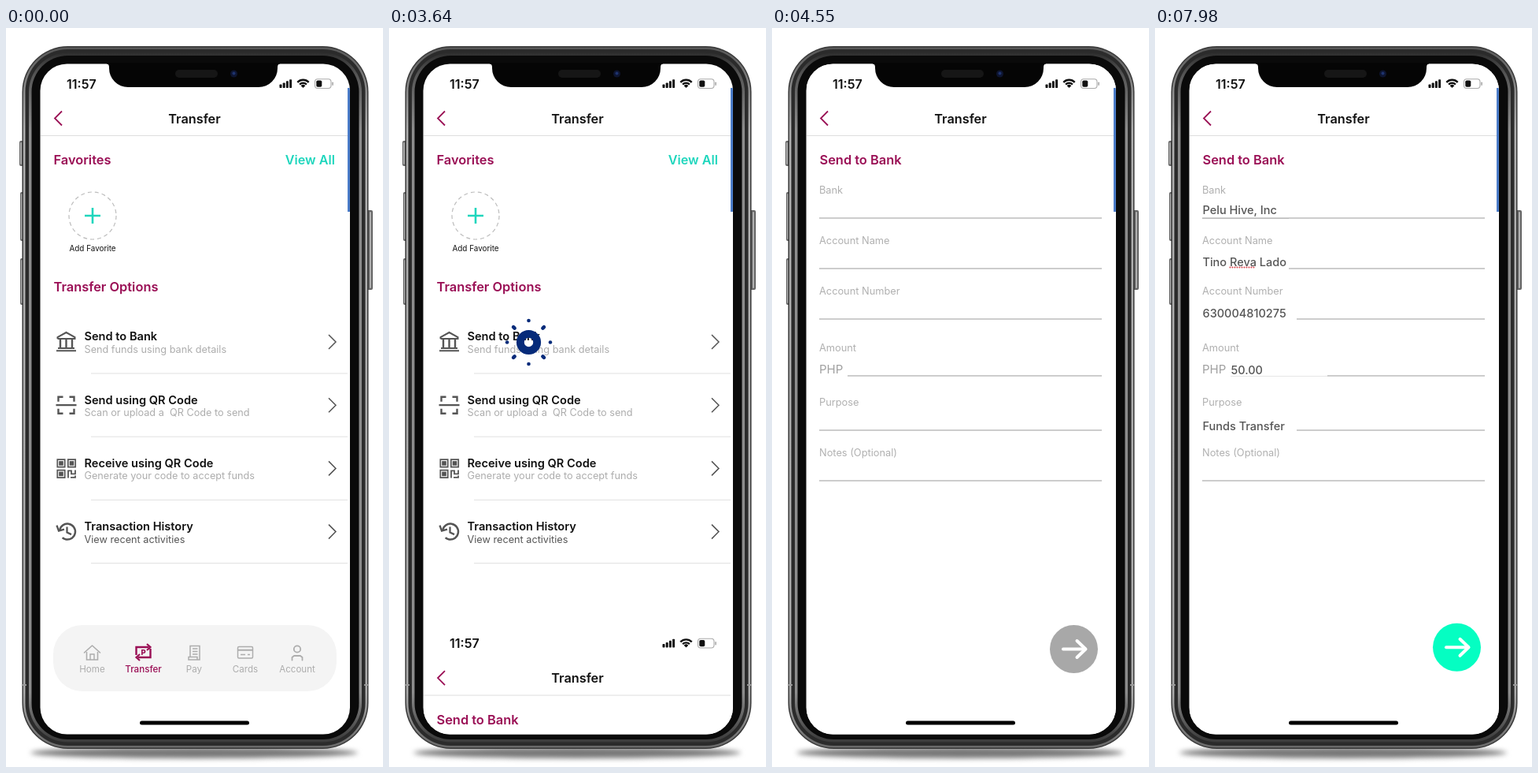
Animation, 479 px wide and 937 px high, one loop 8000 ms. Source, as an HTML page with a canvas:

```html
<!DOCTYPE html>
<html lang="en">
<head>
<meta charset="utf-8">
<title>Transfer flow</title>
<style>
html, body { margin: 0; width: 100%; height: 100%; overflow: hidden; background: #fff; }
canvas { display: block; width: 479px; height: 937px; }
</style>
</head>
<body>
<canvas id="stage"></canvas>
<script>
const W = 479, H = 937, LOOP = 8000, STEP = 70;
const canvas = document.getElementById('stage');
const ctx = canvas.getContext('2d');
const dpr = window.devicePixelRatio || 1;
canvas.width = W * dpr;
canvas.height = H * dpr;

const PLUM = '#9a0f55', TEAL = '#1fd6bd', INK = '#111', GREY = '#adadad', ICON = '#555', NAVY = '#062b7a';

const clamp = v => Math.max(0, Math.min(1, v));
const span = (t, a, b) => clamp((t - a) / (b - a));
const smooth = p => p * p * (3 - 2 * p);
const mix = (a, b, p) => a + (b - a) * p;

// ---------- drawing helpers ----------
function text(str, x, midY, size, weight, color, align = 'left') {
  ctx.font = `${weight} ${size}px Inter, Roboto, sans-serif`;
  ctx.textAlign = align;
  ctx.fillStyle = color;
  ctx.fillText(str, x, midY + size * 0.364);
}

function line(points, color, width, cap = 'butt') {
  ctx.beginPath();
  for (let i = 0; i < points.length; i += 2) ctx.lineTo(points[i], points[i + 1]);
  ctx.strokeStyle = color;
  ctx.lineWidth = width;
  ctx.lineCap = cap;
  ctx.lineJoin = cap === 'round' ? 'round' : 'miter';
  ctx.stroke();
}

function box(x, y, w, h, r, fill) {
  ctx.beginPath();
  ctx.roundRect(x, y, w, h, r);
  ctx.fillStyle = fill;
  ctx.fill();
}

function frame(x, y, w, h, r, color, width) {
  ctx.beginPath();
  ctx.roundRect(x, y, w, h, r);
  ctx.strokeStyle = color;
  ctx.lineWidth = width;
  ctx.stroke();
}

function arc(x, y, r, a, b, color, width) {
  ctx.beginPath();
  ctx.arc(x, y, r, a, b);
  ctx.strokeStyle = color;
  ctx.lineWidth = width;
  ctx.lineCap = 'butt';
  ctx.stroke();
}

function disc(x, y, r, fill) {
  ctx.beginPath();
  ctx.arc(x, y, r, 0, Math.PI * 2);
  ctx.fillStyle = fill;
  ctx.fill();
}

function group(fn) {
  ctx.save();
  fn();
  ctx.restore();
}

function vertical(...stops) {
  const g = ctx.createLinearGradient(0, 23, 0, 914);
  stops.forEach(([at, color]) => g.addColorStop(at, color));
  return g;
}

// ---------- phone ----------
function phone() {
  group(() => {
    ctx.filter = 'blur(3px)';
    ctx.beginPath();
    ctx.ellipse(239, 919, 208, 7, 0, 0, Math.PI * 2);
    ctx.fillStyle = '#777';
    ctx.fill();
  });
  [[17, 143, 32], [18, 208, 62], [18, 292, 59]].forEach(([x, y, h]) => {
    box(x, y, 6, h, 2, '#666');
    box(x + 1, y + 2, 2, h - 4, 1, '#aaa');
  });
  box(458, 231, 8, 101, 2, '#666');
  box(462, 233, 2, 97, 1, '#b0b0b0');

  const rim = vertical([0, '#555'], [0.06, '#8a8a8a'], [0.12, '#b0b0b0'], [0.92, '#acacac'], [1, '#666']);
  const inner = vertical([0, '#222'], [0.04, '#555'], [0.12, '#8c8c8c'], [0.92, '#8c8c8c'], [0.98, '#444'], [1, '#333']);
  const layers = [[0, '#383838'], [1.5, rim], [4, '#2b2b2b'], [8.5, inner], [12, '#0a0a0a']];
  layers.forEach(([d, fill]) => box(20.5 + d, 23 + d, 440 - 2 * d, 891 - 2 * d, 58 - d, fill));
  [21, 455].forEach(x => line([x, 833, x + 5, 833], '#999', 2));
}

function notch() {
  ctx.beginPath();
  ctx.moveTo(128, 44);
  ctx.lineTo(128, 45.5);
  ctx.quadraticCurveTo(131, 45.5, 131, 50);
  ctx.arcTo(131, 75, 155, 75, 24);
  ctx.arcTo(345, 75, 345, 51, 24);
  ctx.lineTo(345, 50);
  ctx.quadraticCurveTo(345, 45.5, 348, 45.5);
  ctx.lineTo(348, 44);
  ctx.fillStyle = '#050505';
  ctx.fill();
  box(215, 53, 54, 10, 5, '#161616');
  disc(289.5, 58, 4.5, '#0e1530');
  disc(289.5, 57.5, 2, '#1e336e');
}

// ---------- shared screen parts ----------
function statusBar() {
  text('11:57', 77, 70.7, 16, 600, INK);
  for (let i = 0; i < 4; i++) {
    const h = 4.5 + i * 2.1;
    box(347.5 + i * 4.2, 76 - h, 3, h, 0.8, INK);
  }
  for (const r of [2.2, 6.2, 10.2]) arc(377.5, 76, r, -Math.PI * 0.75, -Math.PI * 0.25, INK, r < 3 ? 3.6 : 2.4);
  frame(392.5, 64.7, 20.5, 11.8, 3.5, '#aaa', 1.1);
  box(394.3, 66.4, 7, 8.4, 1.8, INK);
  box(414.3, 68.5, 1.6, 4.5, 1, '#aaa');
}

function header() {
  statusBar();
  line([71, 105.5, 62, 114.5, 71, 123.5], PLUM, 1.8);
  text('Transfer', 239.5, 114.7, 16.3, 600, INK, 'center');
  line([44, 136.5, 434, 136.5], '#dedede', 1);
}

function heading(str, y) {
  text(str, 60.5, y, 16.4, 600, PLUM);
}

function homeBar() {
  line([172.5, 881, 306.5, 881], '#000', 5, 'round');
}

// ---------- option icons, drawn around (76.5, y) ----------
function bankIcon(y) {
  line([65.5, y - 4, 65.5, y - 6, 76.5, y - 12, 87.5, y - 6, 87.5, y - 4, 65.5, y - 4], ICON, 2);
  [69, 76.5, 84].forEach(x => line([x, y - 3, x, y + 8], ICON, 2.4));
  line([66, y + 8, 87, y + 8], ICON, 1.8);
  line([64, y + 11.3, 89, y + 11.3], ICON, 2);
}

function scanIcon(y) {
  for (const sx of [-1, 1]) for (const sy of [-1, 1]) {
    line([76.5 + sx * 4, y + sy * 10.5, 76.5 + sx * 10, y + sy * 10.5, 76.5 + sx * 10, y + sy * 4.5], ICON, 2.4);
  }
  line([63.5, y, 89.5, y], ICON, 2.2);
}

function tilesIcon(y) {
  [[64.5, -12], [78, -12], [64.5, 1.5]].forEach(([x, dy]) => {
    frame(x + 0.8, y + dy + 0.8, 9.4, 9.4, 0, ICON, 1.7);
    ctx.fillRect(x + 2.7, y + dy + 2.7, 5.6, 5.6);
  });
  line([79, y + 12, 79, y + 3, 83, y + 3, 83, y + 7, 88, y + 7, 88, y + 2], ICON, 1.8);
  line([82, y + 11.5, 88, y + 11.5, 88, y + 9], ICON, 1.8);
}

function historyIcon(y) {
  arc(78, y, 10, -Math.PI * 0.95, Math.PI * 0.72, ICON, 2.5);
  line([64.5, y - 8, 67, y - 1, 74, y - 3], ICON, 2.3);
  line([77.5, y - 6, 77.5, y + 1, 83, y + 3.5], ICON, 2.3);
}

const OPTIONS = [
  ['Send to Bank', 'Send funds using bank details', bankIcon],
  ['Send using QR Code', 'Scan or upload a  QR Code to send', scanIcon],
  ['Receive using QR Code', 'Generate your code to accept funds', tilesIcon],
  ['Transaction History', 'View recent activities', historyIcon, '#555']
];

function optionBody(i) {
  const [title, note, icon, color] = OPTIONS[i];
  const y = 398 + i * 80.2;
  ctx.fillStyle = ICON;
  icon(y);
  text(title, 99.5, y - 7, 14.6, 600, INK);
  text(note, 99.5, y + 9.3, 12.7, 400, color || GREY);
}

// ---------- tab bar ----------
const TABS = [['Home', 109.5], ['Transfer', 174.5], ['Pay', 239], ['Cards', 304], ['Account', 370]];

function tabIcon(i, x) {
  const c = i === 1 ? PLUM : GREY;
  if (i === 0) {
    line([x - 10, 792, x, 783, x + 10, 792], c, 1.6, 'round');
    line([x - 7, 791, x - 7, 801, x + 7, 801, x + 7, 791], c, 1.6);
    line([x - 2.5, 801, x - 2.5, 794, x + 2.5, 794, x + 2.5, 801], c, 1.4);
  } else if (i === 1) {
    line([x - 9, 795, x - 9, 785, x + 7, 785], c, 2.4);
    line([x + 4.5, 781, x + 9, 785, x + 4.5, 789], c, 2.2);
    line([x + 9, 787, x + 9, 798, x - 7, 798], c, 2.4);
    line([x - 4.5, 794, x - 9, 798, x - 4.5, 802], c, 2.2);
    text('P', x, 791.5, 9.5, 800, c, 'center');
  } else if (i === 2) {
    line([x - 5, 797, x - 5, 783.5, x + 7, 783.5, x + 7, 801, x - 7, 801, x - 7, 797.5, x + 4, 797.5, x + 4, 801], c, 1.5);
    [787, 790.5, 794].forEach(y => line([x - 2, y, x + 4.5, y], c, 1.3));
  } else if (i === 3) {
    frame(x - 9.5, 784.5, 19, 14.5, 1.5, c, 1.5);
    line([x - 9.5, 788.7, x + 9.5, 788.7], c, 2);
    line([x - 6, 794.5, x, 794.5], c, 1.5);
    line([x + 3, 794.5, x + 6, 794.5], c, 1.5);
  } else {
    arc(x, 787.5, 4.2, 0, 7, c, 1.8);
    line([x - 6.5, 801.5, x - 6.5, 798, x - 4, 796, x + 4, 796, x + 6.5, 798, x + 6.5, 801.5], c, 1.8, 'round');
  }
}

function tab(i) {
  const [label, x] = TABS[i];
  tabIcon(i, x);
  text(label, x, 812.7, 11.6, i === 1 ? 500 : 400, i === 1 ? PLUM : GREY, 'center');
}

// Enlarges a patch of the screen about a fixed point.
function magnify(amount, x, y, max, rect, fill, draw) {
  if (amount <= 0) return;
  group(() => {
    const s = mix(1, max, smooth(amount));
    ctx.translate(x, y);
    ctx.scale(s, s);
    ctx.translate(-x, -y);
    ctx.beginPath();
    ctx.rect(...rect);
    ctx.fillStyle = fill;
    ctx.fill();
    ctx.clip();
    draw();
  });
}

function menuScreen(t) {
  header();
  heading('Favorites', 167);
  text('View All', 418, 167, 16.2, 600, TEAL, 'right');
  ctx.setLineDash([5, 4]);
  arc(110, 238, 30, 0, Math.PI * 2, '#bdbdbd', 1.2);
  ctx.setLineDash([]);
  line([100, 238, 120, 238], TEAL, 2.6);
  line([110, 228, 110, 248], TEAL, 2.6);
  text('Add Favorite', 110, 279.5, 9.9, 400, INK, 'center');
  heading('Transfer Options', 328);

  OPTIONS.forEach((_, i) => {
    const y = 398 + i * 80.2;
    optionBody(i);
    line([410, y - 9, 419, y, 410, y + 9], '#555', 1.5);
    line([108, y + 40, 434, y + 40], '#e1e1e1', 1);
  });

  box(60, 757, 360, 84, 37, '#f4f4f4');
  TABS.forEach((_, i) => tab(i));
  homeBar();

  const tabZoom = span(t, 280, 630) - span(t, 1050, 1330);
  magnify(tabZoom, 174.5, 800, 1.55, [134, 773, 81, 48], '#f4f4f4', () => tab(1));
  const rowZoom = span(t, 2310, 2660) - span(t, 3290, 3570);
  magnify(rowZoom, 64, 400, 1.55, [63.5, 375, 228.5, 50], '#fff', () => optionBody(0));
}

// ---------- form ----------
// label, label y, rule y, value, value y, value x, cover end
const FIELDS = [
  ['Bank', 205, 241, 'Pelu Hive, Inc', 230.8, 60, 170],
  ['Account Name', 269, 305, 'Tino Reva Lado', 296.3, 60, 170],
  ['Account Number', 333, 369, '630004810275', 361.7, 60, 180],
  ['Amount', 405, 441, '50.00', 434, 96, 219],
  ['Purpose', 474, 510, 'Funds Transfer', 504.5, 60, 180],
  ['Notes (Optional)', 538, 574]
];

function spellMark(value, x, y) {
  const words = value.split(' ');
  const start = x + ctx.measureText(words[0] + ' ').width;
  const end = start + ctx.measureText(words[1]).width;
  for (let px = start + 1; px < end; px += 3) disc(px, y, 1, '#d8434a');
}

function fieldValue(i, t) {
  const [, , rule, value, y, x, end] = FIELDS[i];
  const begin = 6230 + i * 168;
  const p = smooth(span(t, begin, begin + 168));
  if (!value || p <= 0) return;
  group(() => {
    ctx.beginPath();
    ctx.rect(x - 0.5, rule - 20, (end - x + 0.5) * p, 22);
    ctx.clip();
    ctx.fillStyle = '#fff';
    ctx.fill();
    if (i === 0) line([x, rule + 0.2, end, rule + 0.2], '#a5a5a5', 1.2);
    if (i === 3) line([x, rule + 0.5, end, rule + 0.5], '#e6e6e6', 1);
    text(value, x + 0.5, y, 14.5, 500, '#555');
    if (i === 1) spellMark(value, x, 303.5);
  });
}

function nextButton(t) {
  const p = smooth(span(t, 7070, 7630));
  const y = mix(787.5, 785.3, p);
  const color = `rgb(${mix(168, 5, p)}, ${mix(168, 254, p)}, ${mix(168, 194, p)})`;
  disc(383.5, y, 30.5, color);
  line([370, y, 398, y], '#fff', 4, 'round');
  line([387.5, y - 10.5, 398.5, y, 387.5, y + 10.5], '#fff', 4, 'round');
}

function formScreen(t) {
  ctx.fillStyle = '#fff';
  ctx.fillRect(44, 45.5, 393, 851);
  header();
  heading('Send to Bank', 167);
  FIELDS.forEach(([label, y, rule], i) => {
    text(label, 60, y, 12.8, 400, '#b0b0b0');
    line([i === 3 ? 96 : 60, rule, 419, rule], '#bcbcbc', 1.3);
    fieldValue(i, t);
  });
  text('PHP', 60, 432.3, 15, 400, '#a0a0a0');
  nextButton(t);
  homeBar();
}

// ---------- tap burst ----------
function burst(t) {
  const p = (t - 3570) / 910;
  if (p <= 0 || p >= 1) return;
  const x = 177.5, y = 398.5;
  arc(x, y, 50 * (1 - (1 - p) ** 3), 0, Math.PI * 2, NAVY, 10.7 * (1 - p));
  for (let k = 0; k < 8; k++) {
    const diagonal = k % 2 === 1;
    if (p > (diagonal ? 0.72 : 0.5)) continue;
    const tip = 56 * Math.sqrt(clamp(p / 0.32));
    const tail = diagonal ? mix(41, 56, (p - 0.385) / 0.295) : mix(51, 56, (p - 0.385) / 0.1);
    const from = Math.max(0, Math.min(tip, tail));
    const c = Math.cos(k * Math.PI / 4), s = Math.sin(k * Math.PI / 4);
    line([x + c * from, y + s * from, x + c * (tip + 0.01), y + s * (tip + 0.01)], NAVY, 4.6, 'round');
  }
}

function draw(t) {
  ctx.setTransform(dpr, 0, 0, dpr, 0, 0);
  ctx.fillStyle = '#fff';
  ctx.fillRect(0, 0, W, H);
  phone();
  group(() => {
    ctx.beginPath();
    ctx.roundRect(43.5, 45.5, 393.5, 850, 34);
    ctx.fillStyle = '#fff';
    ctx.fill();
    ctx.clip();
    const rise = span(t, 3570, 4497);
    if (rise < 1) menuScreen(t);
    if (rise > 0) group(() => {
      ctx.translate(0, 850 * (1 - rise) ** 2.3);
      formScreen(t);
    });
    burst(t);
    ctx.fillStyle = '#4a7bc8';
    ctx.fillRect(434, 76, 3, 157);
  });
  notch();
}

const origin = performance.now();
function tick() {
  const t = (performance.now() - origin) % LOOP;
  draw(Math.floor(t / STEP) * STEP);
  requestAnimationFrame(tick);
}
tick();
</script>
</body>
</html>
```
